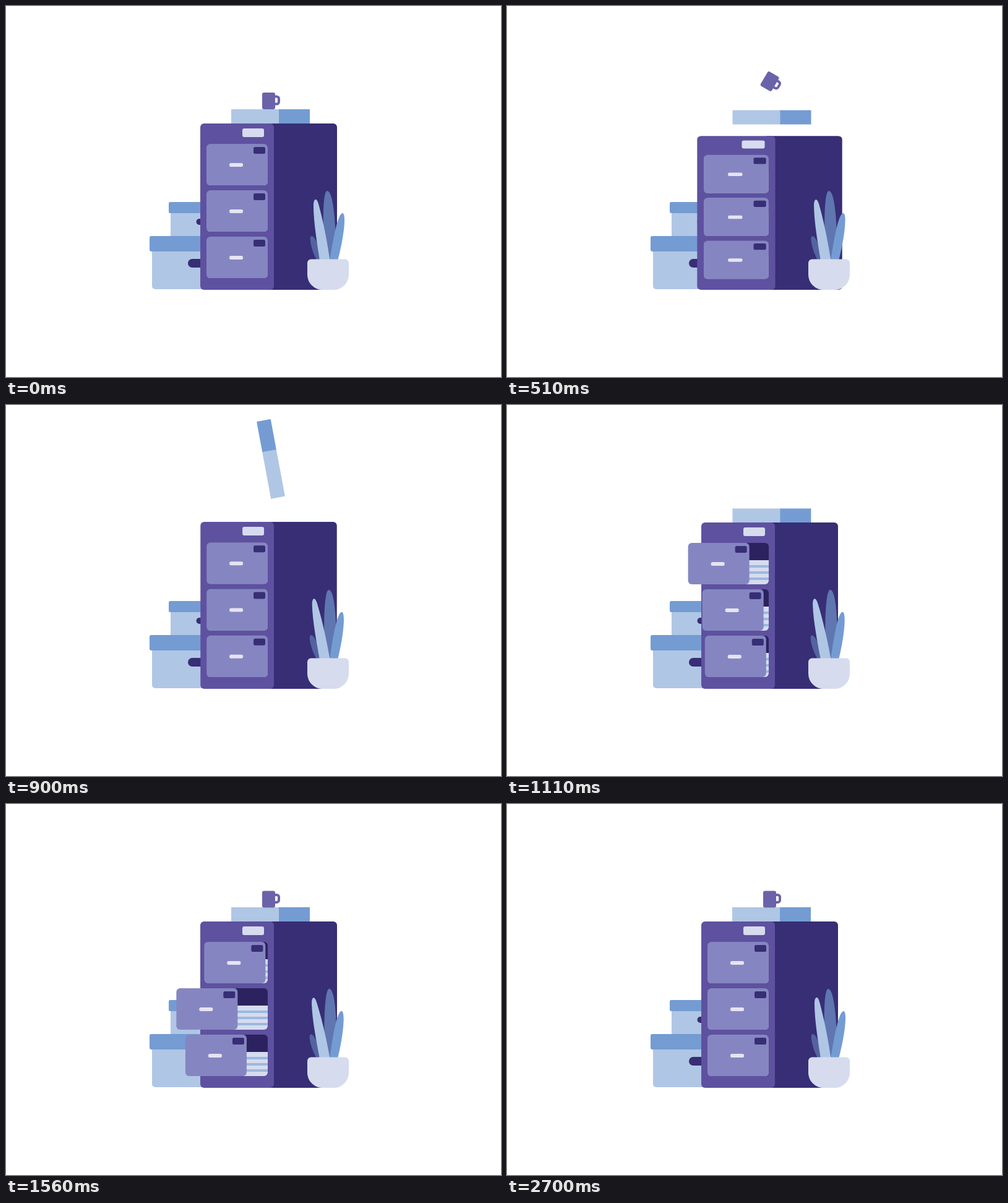
Recreate the animation shown at these times as an HTML page. Size 800 by 600 pixels, loop 2730 ms.

```html
<!DOCTYPE html>
<html lang="en">
<head>
<meta charset="utf-8">
<title>Filing cabinet</title>
<style>
  html, body { margin: 0; width: 100%; height: 100%; overflow: hidden; background: #fff; }
  svg { display: block; width: 800px; height: 600px; }

  :root { --loop: 2730ms; --quad: cubic-bezier(.455, .03, .515, .955); }

  .sky { fill: #749cd3; }
  .ice { fill: #b0c6e5; }
  .mist { fill: #d6dcee; }
  .navy { fill: #372e76; }

  .cabinet { transform-origin: 424.2px 459px; animation: squash var(--loop) var(--quad) infinite; }
  .papers {
    transform-origin: 427.5px 178.5px;
    animation: papers-fly var(--loop) infinite, papers-spin var(--loop) infinite;
  }
  .mug {
    transform-origin: 425px 153.5px;
    animation: mug-fly var(--loop) infinite, mug-spin var(--loop) infinite;
  }
  .front { animation: var(--slide) var(--loop) var(--quad) infinite; }
  .leaf {
    transform-origin: var(--x) 411px;
    animation: sway calc(var(--loop) / 2) cubic-bezier(.37, 0, .63, 1) infinite alternate;
  }

  @keyframes sway { to { rotate: var(--lean); } }

  @keyframes squash {
    0%, 6.227% { scale: 1 1; }
    15.751% { scale: 1.1 .87; }
    24.908% { scale: .92 1.12; }
    34.066%, 100% { scale: 1 1; }
  }

  @keyframes papers-fly {
    0%, 6.227% { translate: 0 0; animation-timing-function: var(--quad); }
    15.751% { translate: 0 35px; animation-timing-function: cubic-bezier(.4, .1, .7, .65); }
    18.681% { translate: .5px 2px; animation-timing-function: cubic-bezier(.3, .4, .6, 1); }
    28.205% { translate: .5px -112px; animation-timing-function: cubic-bezier(.4, 0, .8, .6); }
    39.927% { translate: .5px .5px; }
    45%, 100% { translate: 0 0; }
  }
  @keyframes papers-spin {
    0%, 18.681% { rotate: 0deg; animation-timing-function: cubic-bezier(.333, 0, .667, .333); }
    27.473% { rotate: 112.7deg; animation-timing-function: cubic-bezier(.333, .43, .667, 1); }
    39.927%, 100% { rotate: 360deg; }
  }

  @keyframes mug-fly {
    0%, 6.227% { translate: 0 0; animation-timing-function: var(--quad); }
    15.751% { translate: 0 35px; animation-timing-function: cubic-bezier(.333, .15, .667, .5); }
    18.681% { translate: 0 -30px; animation-timing-function: linear; }
    19.78% { translate: 0 -71px; animation-timing-function: cubic-bezier(.3, .35, .7, 1); }
    27.839% { translate: 0 -360px; animation-timing-function: cubic-bezier(.4, 0, .75, .5); }
    53.846%, 100% { translate: 0 .4px; }
  }
  @keyframes mug-spin {
    0%, 15.751% { rotate: 0deg; animation-timing-function: cubic-bezier(.333, 0, .667, .4); }
    18.681% { rotate: 30deg; animation-timing-function: cubic-bezier(.333, .5, .667, 1); }
    53.846%, 100% { rotate: 360deg; }
  }

  @keyframes slide-top {
    0%, 34.396% { translate: 0; }
    46.886% { translate: -60px; }
    59.341%, 100% { translate: 0; }
  }
  @keyframes slide-middle {
    0%, 36.593% { translate: 0; }
    52.418% { translate: -60px; }
    68.242%, 100% { translate: 0; }
  }
  @keyframes slide-bottom {
    0% { translate: 0; }
    35.897% { translate: 0; animation-timing-function: cubic-bezier(.333, .1, .667, .6); }
    57.143% { translate: -34px; animation-timing-function: cubic-bezier(.333, .28, .667, 1); }
    67.766% { translate: -58px; }
    91.392%, 100% { translate: 0; }
  }
</style>
</head>
<body>
<svg viewBox="0 0 800 600">
  <defs>
    <clipPath id="slot"><rect x="324" y="223" width="99" height="67" rx="6"/></clipPath>
    <g id="inside" clip-path="url(#slot)">
      <rect x="325" y="223" width="98" height="67" fill="#2c225f"/>
      <rect class="mist" x="325" y="251" width="98" height="39"/>
      <path d="M325 261h98m-98 10h98m-98 10h98" stroke="#9ab9e0" stroke-width="4"/>
    </g>
    <g id="face">
      <rect x="324" y="223" width="99" height="67" rx="6" fill="#8586c1"/>
      <rect class="navy" x="400" y="228" width="19" height="11" rx="2.5"/>
      <rect x="361" y="254" width="22" height="6" rx="2.5" fill="#e6e4f2"/>
    </g>
  </defs>

  <!-- storage boxes -->
  <rect class="ice" x="266" y="330" width="94" height="50"/>
  <rect class="sky" x="263" y="317" width="100" height="18" rx="2.5"/>
  <rect class="navy" x="307.5" y="344" width="40" height="10" rx="5"/>
  <rect class="ice" x="236" y="385" width="130" height="73" rx="5"/>
  <rect class="sky" x="232" y="372" width="138" height="25" rx="3"/>
  <rect class="navy" x="294" y="409" width="50" height="14" rx="7"/>

  <g class="papers">
    <rect class="ice" x="364" y="167" width="78" height="23"/>
    <rect class="sky" x="441" y="167" width="50" height="23"/>
  </g>

  <g class="mug">
    <rect x="414" y="140" width="21" height="27" rx="3" fill="#6b63a9"/>
    <path d="M434 146.5h3.5a3.5 3.5 0 0 1 3.5 3.5v5a3.5 3.5 0 0 1-3.5 3.5h-3.5"
          fill="none" stroke="#6b63a9" stroke-width="4"/>
  </g>

  <g class="cabinet">
    <rect class="navy" x="415" y="190" width="120" height="269" rx="6"/>
    <rect x="314" y="190" width="119" height="269" rx="6" fill="#5e519f"/>
    <rect class="mist" x="382" y="198" width="35" height="14" rx="3"/>
    <g>
      <use href="#inside"/>
      <g class="front" style="--slide: slide-top"><use href="#face"/></g>
    </g>
    <g transform="translate(0 75)">
      <use href="#inside"/>
      <g class="front" style="--slide: slide-middle"><use href="#face"/></g>
    </g>
    <g transform="translate(0 150)">
      <use href="#inside"/>
      <g class="front" style="--slide: slide-bottom"><use href="#face"/></g>
    </g>
  </g>

  <!-- plant -->
  <path class="leaf" style="--x: 507px; --lean: -2deg" fill="#54639f"
        d="M503 412C495 400 488 372 494 372C500 372 506 390 510 412Z"/>
  <path class="leaf" style="--x: 525px; --lean: 1.8deg" fill="#5f76b0"
        d="M517 412C512 385 510 299 519 299C528 299 533 340 534 412Z"/>
  <path class="leaf sky" style="--x: 530px; --lean: -1.3deg"
        d="M523 412C528 380 536 335 544 335C550 336 547 370 536 412Z"/>
  <path class="leaf ice" style="--x: 515px; --lean: -2deg"
        d="M507 412C503 385 497 350 497 323C497 311 502 309 505 320C512 345 519 380 523.5 412Z"/>
  <path class="mist" d="M493 409.5h55a6 6 0 0 1 6 6v19a24.5 24.5 0 0 1-24.5 24.5h-18a24.5 24.5 0 0 1-24.5-24.5v-19a6 6 0 0 1 6-6z"/>
</svg>
</body>
</html>
```
